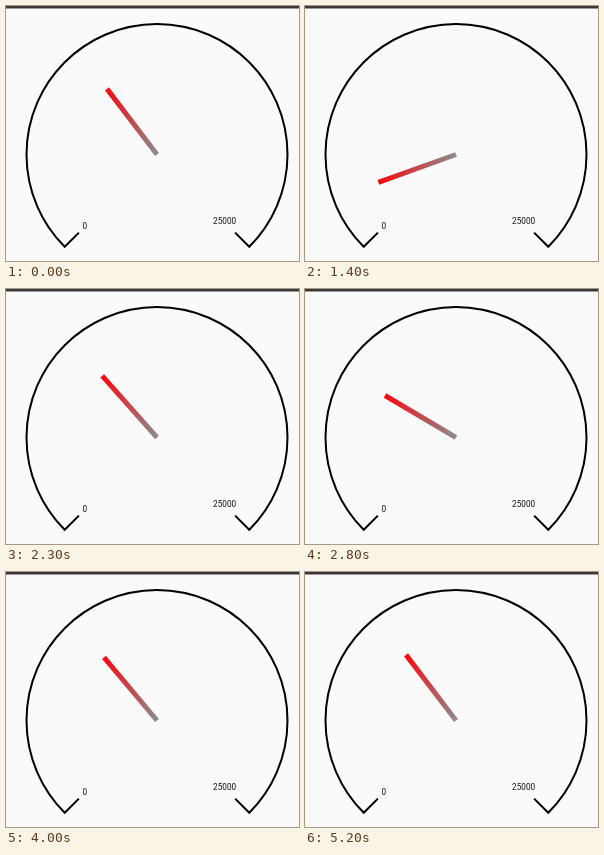
An HTML page that plays this animation: 293x255 px, repeating every 5.8 s.

```html
<!DOCTYPE html>
<html lang="en">
<head>
<meta charset="utf-8">
<title>Gauge</title>
<style>
  html, body { margin: 0; width: 100%; height: 100%; overflow: hidden; background: #fafafa; }
  svg { display: block; width: 293px; height: 255px; }
  text { font: 8.2px Roboto, Arial, sans-serif; fill: #111; text-anchor: middle; }
  .dial { fill: none; stroke: #000; stroke-width: 2; }
</style>
</head>
<body>
<svg viewBox="0 0 293 255">
  <defs>
    <linearGradient id="fade">
      <stop offset="0" stop-color="#f8080e"/>
      <stop offset="1" stop-color="#8c8c8c"/>
    </linearGradient>
  </defs>
  <rect width="293" height="255" fill="#fafafa"/>
  <rect width="293" height="2.5" fill="#3a383b"/>
  <g transform="translate(151 148.5)">
    <path class="dial" d="M-78.1 78.1L-92.3 92.3A130.5 130.5 0 1 1 92.3 92.3L78.1 78.1"/>
    <rect id="needle" x="-82.5" y="-2.5" width="82.5" height="5" fill="url(#fade)"/>
  </g>
  <text x="78.8" y="223">0</text>
  <text x="218.6" y="218">25000</text>
</svg>
<script>
  const LOOP = 5800, STEP = 100;
  const START = 550, DURATION = 4600, HOLD = 600;
  const FROM = -45, TO = 52.7;
  const needle = document.getElementById('needle');

  // Each bounce: end of the arc, its centre, its lowest value (in 1/2.75 units).
  const arcs = [[1, 0, 0], [2, 1.5, 0.75], [2.5, 2.25, 0.9375], [2.75, 2.625, 0.984375]];

  function bounce(u) {
    if (u >= 1) return 1;
    const x = u * 2.75;
    const [, mid, low] = arcs.find(([end]) => x < end);
    return (x - mid) ** 2 + low;
  }

  function angleAt(time) {
    const t = Math.floor(time / STEP) * STEP;
    const p = t < HOLD ? 1 : bounce((t - START) / DURATION);
    return FROM + (TO - FROM) * p;
  }

  const begin = performance.now();

  function draw() {
    const t = Math.max(0, performance.now() - begin) % LOOP;
    needle.setAttribute('transform', `rotate(${angleAt(t).toFixed(3)})`);
    requestAnimationFrame(draw);
  }
  draw();
</script>
</body>
</html>
```
